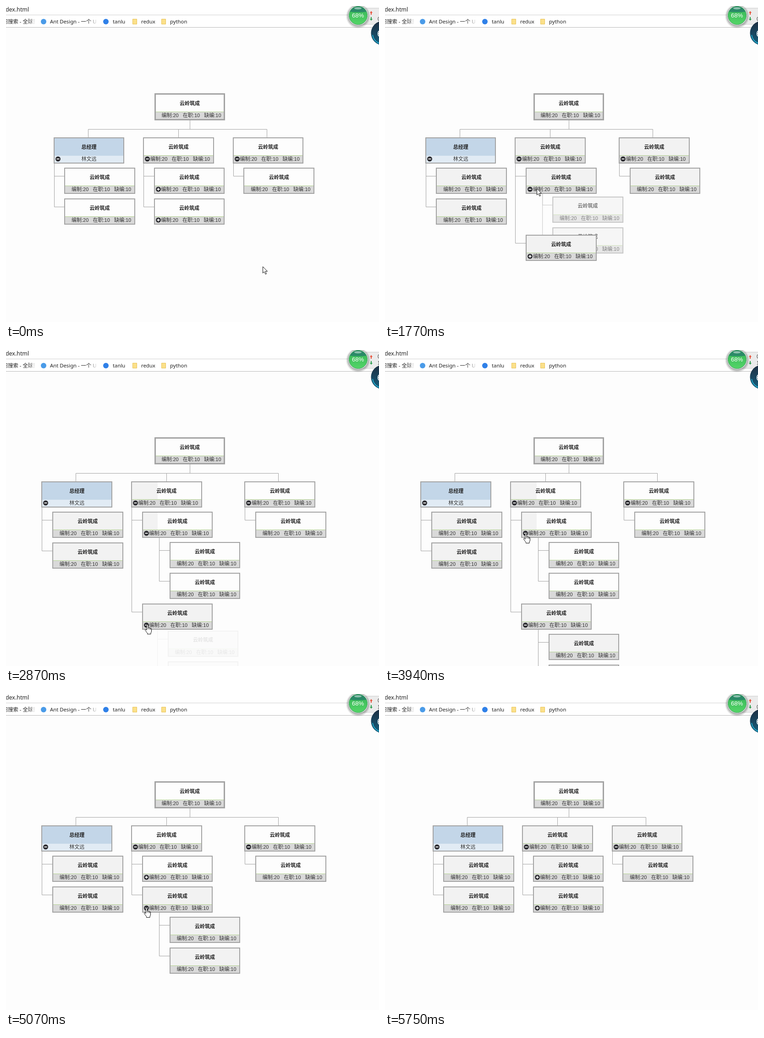
These frames come from a looping animation (814x688 px, 6.03 s). An HTML page:

```html
<!DOCTYPE html>
<html lang="zh">
<head>
<meta charset="utf-8">
<title>index.html</title>
<style>
html, body { margin: 0; width: 100%; height: 100%; overflow: hidden; background: #fdfdfd; }
svg { display: block; }
text { font-family: "Liberation Sans", "Noto Sans CJK SC", "Noto Sans CJK", sans-serif; font-size: 11px; fill: #333; }
.title { font-weight: bold; text-anchor: middle; fill: #222; }
.mid { text-anchor: middle; }
.bar text { font-family: "Noto Sans", "Noto Sans CJK SC", "Noto Sans CJK", sans-serif; font-size: 11.3px; fill: #222; }
.bar .tab { font-size: 12.4px; }
.speed { font-size: 10px; }
.ball { font-size: 13px; fill: #fff; text-anchor: middle; }
.line { fill: none; stroke: #a3a3a3; }
</style>
</head>
<body>
<svg width="814" height="688" viewBox="0 0 814 688">
  <defs>
    <linearGradient id="fade"><stop offset="0" stop-color="#fff" stop-opacity="0"/><stop offset="1" stop-color="#fff"/></linearGradient>
    <linearGradient id="green" x2="0" y2="1"><stop offset="0" stop-color="#35b357"/><stop offset="1" stop-color="#55d768"/></linearGradient>
    <linearGradient id="navy" x2="0" y2="1"><stop offset="0" stop-color="#1d2d40"/><stop offset="1" stop-color="#17607f"/></linearGradient>
    <radialGradient id="shadow"><stop offset=".75" stop-color="#000" stop-opacity=".35"/><stop offset="1" stop-color="#000" stop-opacity="0"/></radialGradient>
    <clipPath id="disc"><circle cx="768.5" cy="20.5" r="20"/></clipPath>
  </defs>
  <rect width="814" height="688" fill="#fdfdfd"/>
  <g class="bar">
    <rect width="814" height="46" fill="#fff"/>
    <path d="M0 19.5H814" stroke="#d0d0d0"/>
    <path d="M0 46.5H814" stroke="#b9b9b9"/>
    <text class="tab" x="-1" y="12">dex.html</text>
    <text x="-7" y="38">问搜索 - 全球搜</text>
    <rect x="50" y="22" width="14" height="22" fill="url(#fade)"/>
    <rect x="64" y="22" width="10" height="22" fill="#fff"/>
    <circle cx="82" cy="34" r="6" fill="#4a9be8"/>
    <text x="96" y="38">Ant Design - 一个 U</text>
    <rect x="180" y="22" width="20" height="22" fill="url(#fade)"/>
    <circle cx="218" cy="34" r="6" fill="#2f80e8"/>
    <text x="233" y="38">tanlu</text>
    <path d="M276.500 28.500h9v11h-9zM339.500 28.500h9v11h-9z" fill="#fbe08a" stroke="#e8c45c"/>
    <text x="295" y="38">redux</text>
    <text x="358" y="38">python</text>
  </g>
  <g id="chart"></g>
  <path d="M768 4.500H820V40H768" fill="#ebebeb" stroke="#cfcfcf"/>
  <path d="M797 11l3 4h-2v4h-2v-4h-2z" fill="#e8503a"/>
  <path d="M797 32l3-4h-2v-4h-2v4h-2z" fill="#2f9e50"/>
  <g id="speed"></g>
  <circle cx="768.5" cy="22" r="27" fill="url(#shadow)"/>
  <circle cx="768.5" cy="20.5" r="22" fill="#f0f0f0" stroke="#9aa59f"/>
  <g clip-path="url(#disc)">
    <rect x="748" y="0" width="42" height="42" fill="url(#green)"/>
    <path d="M748 0H790V12Q768 15 748 12Z" fill="#2b8a68"/>
    <ellipse cx="768" cy="5" rx="8" ry="2.500" fill="#fff" opacity=".45"/>
  </g>
  <circle cx="768.5" cy="20.5" r="20" fill="none" stroke="#3c9a5b"/>
  <text class="ball" x="768" y="25">68%</text>
  <circle cx="823" cy="59" r="26.500" fill="url(#navy)"/>
  <path d="M800 63A23.500 23.500 0 0 0 814 81" fill="none" stroke="#25c3e6" stroke-width="1.500"/>
  <text x="810" y="67" style="font-size:21px;fill:#fff">6</text>
  <g id="cursor"></g>
</svg>
<script>
const LOOP = 6030, BEATS = 44, LEAD = 36;
const W = 154.6, H = 57, ROW = 66.4, TOP = 286, INDENT = 23.6;
const ORG = '云岭筑成', BOSS = '林文远';
const STATS = ['编制:20', '在职:10', '缺编:10'].join('\u00a0\u00a0\u00a0');
const WHITE = '#fdfdfd', SOFT = '#f2f2f2', EDGE = '#a3a3a3';
const FIRST = { open: 12, shut: 31 }, SECOND = { open: 21, shut: 38 };
const REPAINT = 16, CLOSED = 39;

// beat, x, y of the pointer at its turning points
const stops = [
  [0, 560, 567], [3, 395, 394], [5, 342, 350], [8, 316, 348], [10, 326, 394],
  [12, 331, 397], [15, 331, 397], [18, 306, 572], [20, 303, 597], [22, 303, 597],
  [24, 332, 491], [28, 302, 399], [33, 302, 399], [36, 301, 464], [39, 301, 466],
  [40, 306, 476], [42, 968, 868]
];

const $ = id => document.getElementById(id);
const { round, min, hypot } = Math;
const mix = (a, b, u) => a + (b - a) * u;
const smooth = u => u * u * (3 - 2 * u);
const within = (n, a, b) => n >= a && n < b;
const isOpen = (n, branch) => within(n, branch.open, branch.shut);
const ramp = (n, from, lead) => n < from ? 0 : min(1, (n - from) / 2 + lead);
const amount = (n, branch) => ramp(n, branch.open, .1) - ramp(n, branch.shut, .2);

const rect = (x, y, w, h, fill) => `<rect x="${x}" y="${y}" width="${w}" height="${h}" fill="${fill}"/>`;
const text = (x, y, s, cls = '') => `<text class="${cls}" x="${x}" y="${y}">${s}</text>`;
const line = d => `<path class="line" d="${d}"/>`;

function layout(n) {
  const p = amount(n, FIRST), q = amount(n, SECOND), wide = Math.max(p, q);
  const cols = [mix(103.6, 77.4, wide), mix(299.2, 273, wide), mix(494.8, 520.4, wide)];
  const y1 = round(TOP + ROW), y2 = round(TOP + ROW * 2), low = round(TOP + ROW * (2 + 2 * p));
  return { p, q, cols, y1, y2, low };
}

function badge(x, y, open) {
  const bar = `M${x - 3} ${y}h6` + (open ? '' : `M${x} ${y - 3}v6`);
  return `<circle cx="${x}" cy="${y}" r="5.500" fill="#2e2e33"/><path d="${bar}" stroke="#fff" stroke-width="1.800"/>`;
}

// frame, header and footer shared by every box
function shell(x, y, b, head, foot) {
  const left = round(x), w = round(x + W) - left, inner = w - 2 * b;
  return rect(left, y, w, H + 2 * (b - 2), EDGE) + rect(left + b, y + b, inner, 38, head) +
    rect(left + b, y + b + 38, inner, 15, foot);
}

// sign: true shows minus, false shows plus, undefined shows none
function box(x, y, fill, sign, split, b = 2) {
  const left = round(x) + b, top = y + b, inner = round(x + W) - b - left;
  let s = shell(x, y, b, fill, '#d9d9d9');
  if (split) s += rect(left, top, 331 - left, 37, SOFT);
  s += rect(left, top + 37, inner, 1, '#b4d392');
  s += text(x + W / 2, top + 22.5, ORG, 'title') + text(x + 15.8, top + 49, STATS);
  return sign === undefined ? s : s + badge(round(x) + 9.5, y + 47, sign);
}

function bossBox(x, y) {
  return shell(x, y, 2, '#c3d6e8', '#e1ebf4') + text(x + W / 2, y + 24.5, '总经理', 'title') +
    text(x + W / 2, y + 51, BOSS, 'mid') + badge(round(x) + 9.5, y + 47, true);
}

const link = (x, from, y, to) => line(`M${round(x) + .5} ${from}V${y + 18.5}H${round(to)}`);

function child(x, y, ...look) {
  return link(x + 1, TOP + H, y, x + INDENT) + box(x + INDENT, y, ...look);
}

function pair(x, y, p, fill) {
  if (p <= 0) return '';
  let s = '';
  for (const i of [1, 2]) {
    const by = round(y + ROW * i);
    s += link(x + 37.6, y + H, by, x + 60) + box(x + 60, by, fill);
  }
  return `<g opacity="${p}" transform="translate(${-4.4 * (1 - p)} ${-7.8 * (1 - p)})">${s}</g>`;
}

function chart(n) {
  const { p, q, cols: [a, b, c], y1, y2, low } = layout(n);
  const left = n >= FIRST.open ? SOFT : WHITE;
  const right = within(n, FIRST.open, REPAINT) || n >= CLOSED ? SOFT : WHITE;
  const split = within(n, REPAINT, FIRST.shut);
  const [da, db, dc] = [a + 75.5, b + 77, c + 74.5].map(x => Math.floor(x) + .5);

  return box(323.6, 190, WHITE, undefined, false, 3) +
    line(`M401.5 249V268.5M${da} ${TOP}V268.5H${dc}V${TOP}M${db} 268.5V${TOP}`) +
    bossBox(a, TOP) + child(a, y1, left) + child(a, y2, left) +
    box(b, TOP, right, true, split) +
    pair(b + INDENT, y1, p, right) + child(b, y1, right, isOpen(n, FIRST), split) +
    pair(b + INDENT, low, q, SOFT) + child(b, low, left, isOpen(n, SECOND)) +
    box(c, TOP, right, true) + child(c, y1, right);
}

function pointer(n) {
  const i = stops.findIndex(s => s[0] > n);
  if (i < 0) return stops[stops.length - 1].slice(1);
  const [n0, x0, y0] = stops[i - 1], [n1, x1, y1] = stops[i];
  const u = smooth((n - n0) / (n1 - n0));
  return [round(mix(x0, x1, u)), round(mix(y0, y1, u))];
}

const HAND = 'M4 13V2.500Q4 .5 5.500 .5T7 2.500V7.500Q9.500 6 10 8.200Q12 7 12.500 9Q14.500 8.500 14.500 11V15Q14.500 17 13 19V21.500H5.500V19.500L1 13.500Q0 11.500 1.500 11T4 13ZM7 7.500V11M10 8.200V11.500M12.500 9V12';
const ARROW = 'M.5 .5V14.500L3.700 11.500L6.200 17L8.500 16L6 10.700H10.500Z';

// the pointer turns into a hand over a fold badge
function cursor(n) {
  const [x, y] = pointer(n), { cols, y1, low } = layout(n);
  const bx = cols[1] + INDENT + 9.5;
  const over = [y1, low].some(by => hypot(x + 5 - bx, y - by - 47) < 9);
  return `<path transform="translate(${x} ${y})" d="${over ? HAND : ARROW}" fill="#fff" stroke="#111" stroke-linejoin="round"/>`;
}

function speed(n) {
  const busy = within(n, REPAINT, SECOND.shut);
  return text(811, 18, busy ? '0' : '', 'speed') + text(811, 32, busy ? '1' : '0', 'speed');
}

const parts = { chart, cursor, speed };
let shown = -1;

function draw(t) {
  const n = Math.floor((t + LEAD) * BEATS / LOOP) % BEATS;
  if (n === shown) return;
  shown = n;
  for (const id in parts) $(id).innerHTML = parts[id](n);
}

const start = performance.now();
function tick(now) {
  draw(Math.max(0, now - start) % LOOP);
  requestAnimationFrame(tick);
}
draw(0);
requestAnimationFrame(tick);
</script>
</body>
</html>
```
